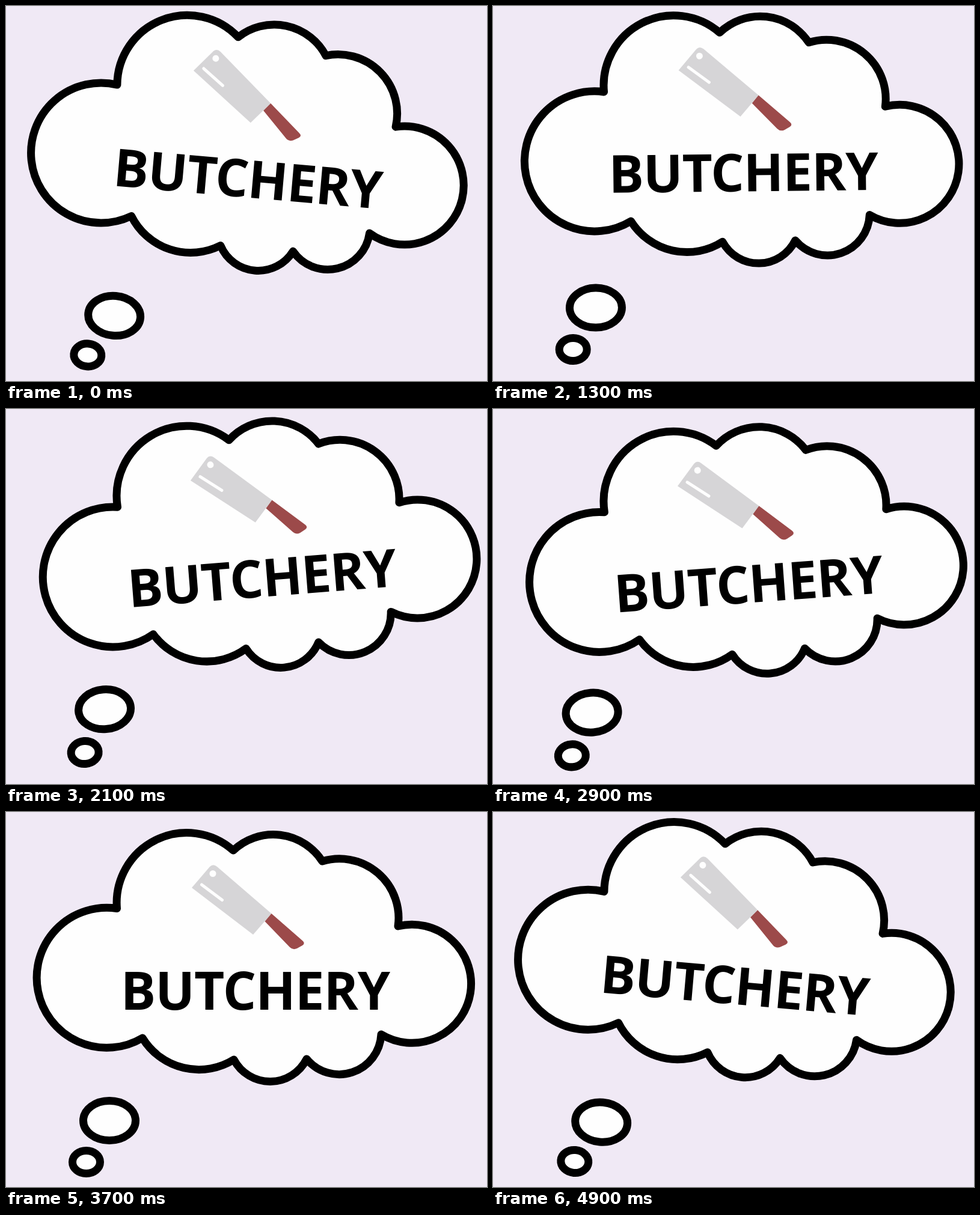
An HTML page for the animation above (5000 ms loop, 800 by 624 pixels).

```html
<!DOCTYPE html>
<html lang="en">
<head>
<meta charset="utf-8">
<title>Butchery thought</title>
<style>
  html, body { margin: 0; width: 100%; height: 100%; overflow: hidden; background: #f0e9f5; }
  svg { display: block; width: 100vw; height: 100vh; }
  .outline { fill: #fefefe; stroke: #000; stroke-width: 13; stroke-linejoin: round; }
  .blade { fill: #d6d5d7; }
  .handle { fill: #9c4a4a; }
  .slot { fill: none; stroke: #fefefe; stroke-width: 5; stroke-linecap: round; }
  .hole { fill: #fefefe; }
  text { font: 700 87px "Open Sans", "Noto Sans", sans-serif; letter-spacing: -1px; text-anchor: middle; }
</style>
</head>
<body>
<svg viewBox="0 0 800 624">
  <g id="bubbles">
    <ellipse class="outline" cx="172" cy="513.5" rx="43.5" ry="33"/>
    <ellipse class="outline" cx="133.5" cy="582.5" rx="23" ry="19"/>
  </g>
  <g id="cloud">
    <path class="outline" d="M227 376
      A116.5 116.5 0 1 1 184.5 160.5
      A116.5 116.5 0 0 1 378 64
      A97 97 0 0 1 526 82
      A98.5 98.5 0 0 1 652 190
      A98.5 98.5 0 1 1 624 370
      A70 70 0 0 1 500 411
      A68 68 0 0 1 379 412
      A110 110 0 0 1 227 376Z"/>
    <path class="blade" d="M309 126 L411 204 L441.5 169 L351 91 Q344.5 85.5 339 91Z"/>
    <circle class="hole" cx="344" cy="102.5" r="5.5"/>
    <path class="slot" d="M325.5 121 L359.5 146.5"/>
    <path class="handle" d="M430.5 182 L441.5 169 L493 214 Q498.5 218.5 493 222 L484 227 Q477 230 472 225Z"/>
    <text x="414.5" y="328.5">BUTCHERY</text>
  </g>
</svg>
<script>
  const LOOP = 5000, STEP = 100, TILT = 5;
  const parts = [
    { el: document.getElementById("cloud"), x: 400, y: 156, bob: 10 },
    { el: document.getElementById("bubbles"), x: 89, y: 611, bob: 5.3 }
  ];

  // Each part tilts about its pivot while it bobs a quarter turn out of phase.
  function draw() {
    const time = Math.floor(performance.now() % LOOP / STEP) * STEP + STEP / 2;
    const phase = time / LOOP * 2 * Math.PI;
    const angle = TILT * Math.cos(phase);
    for (const { el, x, y, bob } of parts) {
      const lift = -bob * (1 + Math.sin(phase));
      el.setAttribute("transform", `translate(0 ${lift}) rotate(${angle} ${x} ${y})`);
    }
    requestAnimationFrame(draw);
  }
  draw();
</script>
</body>
</html>
```
